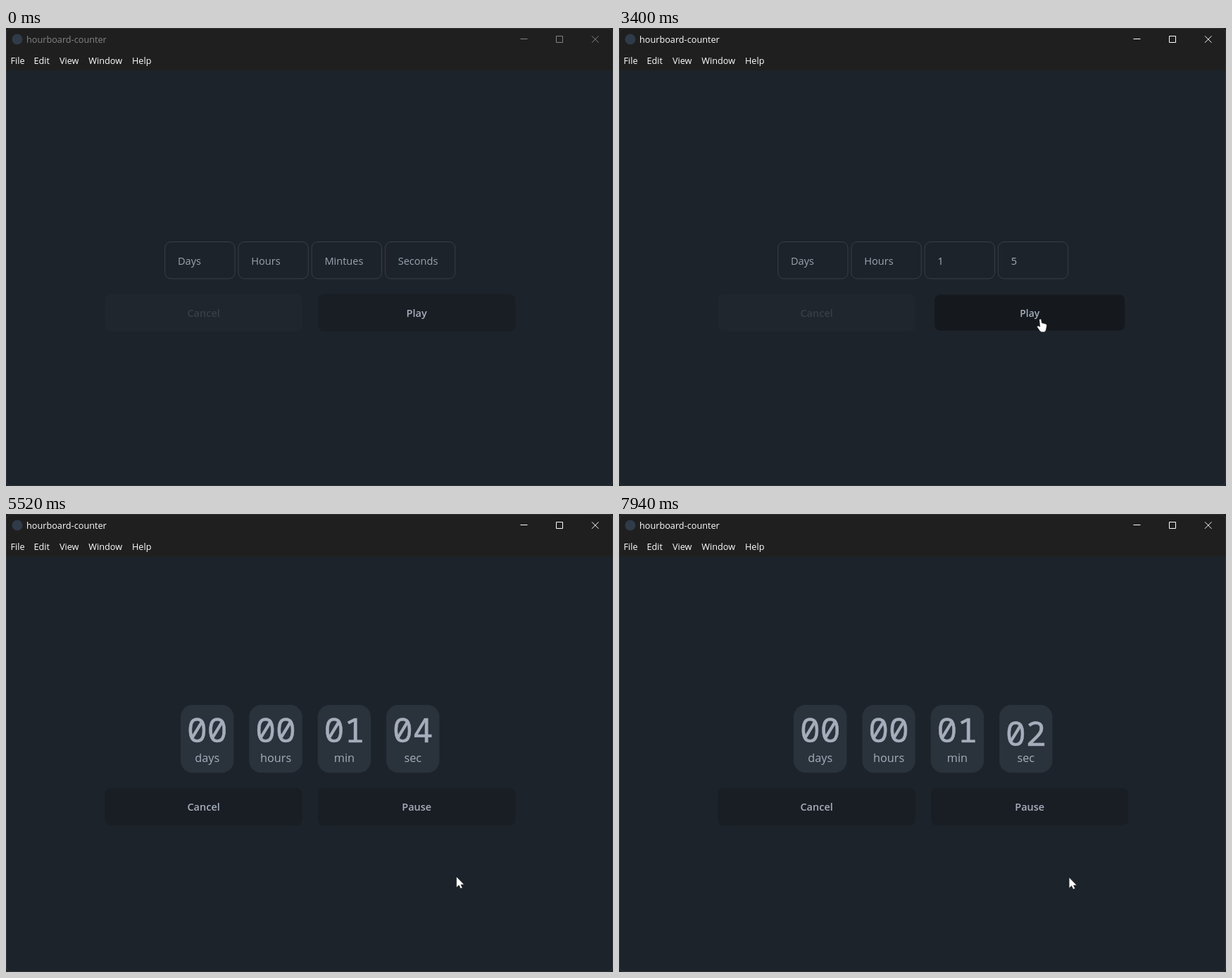
Recreate the animation shown at these times as an HTML page. Size 862 by 650 pixels, loop 8000 ms.

```html
<!DOCTYPE html>
<html lang="en">
<head>
<meta charset="utf-8">
<title>Countdown</title>
<style>
html, body { margin: 0; width: 100%; height: 100%; overflow: hidden; background: #1d232a; }
svg { display: block; width: 862px; height: 650px; font-family: "Open Sans", "Noto Sans", sans-serif; }
.digits { font: 48px "Noto Sans Mono", "DejaVu Sans Mono", monospace; stroke: #a6adbb; stroke-width: .6px; }
.mid { text-anchor: middle; }
</style>
</head>
<body>
<svg id="stage" viewBox="0 0 862 650" xmlns="http://www.w3.org/2000/svg"></svg>
<script>
const LOOP = 8000, FOCUS = 1430, TYPE_MIN = 1700, SECONDS_CLICK = 2240, TYPE_SEC = 2590, PRESS = 3340, START = 3465;
const TEXT = '#a6adbb', BASE = '#1d232a', BUTTON = '#191e24', FAINT = '#383f47', LINE = 52.3;
const stage = document.getElementById('stage');

function add(parent, tag, attrs = {}, text = '') {
  const el = document.createElementNS('http://www.w3.org/2000/svg', tag);
  set(el, attrs);
  el.textContent = text;
  parent.appendChild(el);
  return el;
}
function set(el, attrs) {
  for (const key in attrs) el.setAttribute(key, attrs[key]);
}
const show = (el, on) => set(el, { visibility: on ? 'visible' : 'hidden' });
const clamp = v => Math.max(0, Math.min(1, v));
const smooth = v => v * v * (3 - 2 * v);

// cubic-bezier(1, 0, 0, 1)
function snapEase(x) {
  if (x <= 0) return 0;
  if (x >= 1) return 1;
  let lo = 0, hi = 1;
  for (let i = 0; i < 24; i++) {
    const m = (lo + hi) / 2;
    if (3 * m * (1 - m) ** 2 + m ** 3 < x) lo = m; else hi = m;
  }
  return smooth(lo);
}

// window frame
add(stage, 'rect', { width: 862, height: 650, fill: BASE });
add(stage, 'rect', { width: 862, height: 60, fill: '#1f1f1f' });
add(stage, 'rect', { x: .5, y: .5, width: 861, height: 649, rx: 7, fill: 'none', stroke: '#45474a', 'stroke-opacity': .5 });
add(stage, 'circle', { cx: 16, cy: 16, r: 7.5, fill: '#2f3b49' });
const title = add(stage, 'text', { x: 29, y: 21.3, 'font-size': 12.7 }, 'hourboard-counter');
const controls = add(stage, 'path', {
  d: 'M730.5 15.5H740.5M781.5 11.5H790.5V20.5H781.5ZM832 11.3L841.5 20.8M841.5 11.3L832 20.8', fill: 'none'
});
[['File', 6.5], ['Edit', 39.5], ['View', 76], ['Window', 117.3], ['Help', 179]].forEach(([label, x]) =>
  add(stage, 'text', { x, y: 51, 'font-size': 12.7, fill: '#fff' }, label));

// setup form
const form = add(stage, 'g');
const fields = ['Days', 'Hours', 'Mintues', 'Seconds'].map((name, i) => {
  const x = 225.7 + i * 104.25, g = add(form, 'g');
  add(g, 'rect', { x, y: 303.5, width: 99.3, height: 52.3, rx: 8.5, fill: BASE, stroke: FAINT });
  const ring = add(g, 'rect', { x: x - 2.2, y: 301, width: 103.7, height: 57.3, rx: 10.5, fill: 'none', stroke: '#41464f', 'stroke-width': 2 });
  const text = add(g, 'text', { x: x + 18.2, y: 336, 'font-size': 14.6 });
  const spin = add(g, 'g');
  add(spin, 'rect', { x: x + 82.5, y: 304, width: 17, height: 51.7, fill: '#464646' });
  add(spin, 'path', { d: `M${x + 84} 320L${x + 91} 312.7L${x + 98} 320ZM${x + 84} 339.7H${x + 98}L${x + 91} 347Z`, fill: '#fff' });
  const caret = add(g, 'rect', { y: 320, width: 1, height: 21, fill: TEXT });
  return { name, x, ring, text, spin, caret };
});

// countdown cards
add(add(add(stage, 'defs'), 'clipPath', { id: 'window' }), 'rect', { x: 248, y: 279.7, width: 368, height: LINE });
const cards = add(stage, 'g');
const rollers = ['days', 'hours', 'min', 'sec'].map((label, i) => {
  const cx = 285.7 + i * 97.35;
  add(cards, 'rect', { x: cx - 37.7, y: 271, width: 75.4, height: 96.2, rx: 17, fill: '#2a323c' });
  add(cards, 'text', { class: 'mid', x: cx, y: 352, 'font-size': 16.3, fill: TEXT }, label);
  const g = add(cards, 'g', { 'clip-path': 'url(#window)' });
  return [0, 1].map(() => add(g, 'text', { class: 'mid digits', x: cx, fill: TEXT }));
});
function roll(pair, value) {
  pair.forEach((el, i) => {
    const n = Math.floor(value) + i;
    el.textContent = String(n).padStart(2, '0');
    set(el, { y: 324 + (n - value) * LINE });
    show(el, n - value < 1);
  });
}

// buttons
function makeButton(cx) {
  const g = add(stage, 'g');
  const box = add(g, 'rect', { x: cx - 140.2, y: 377.5, width: 280.4, height: 53, rx: 8.5 });
  const text = add(g, 'text', { class: 'mid', x: cx, y: 409.8, 'font-size': 14.5, 'font-weight': 600, fill: TEXT });
  return { g, box, text, cx };
}
const cancel = makeButton(280.6), play = makeButton(583.2);
cancel.text.textContent = 'Cancel';
function place(button, dy, scale) {
  set(button.g, { transform: `translate(${button.cx} ${404 + dy}) scale(${scale}) translate(${-button.cx} -404)` });
}
function popScale(t) {
  if (t < PRESS) return 1;
  if (t < START) return 1 - .036 * clamp((t - PRESS) / 50);
  const p = clamp((t - START) / 250);
  return p < .4 ? .98 + .04 * smooth(p / .4) : 1.02 - .02 * smooth((p - .4) / .6);
}

// pointer shapes, each drawn around its hot spot
const pointer = add(stage, 'g');
const outline = { fill: '#fff', stroke: '#111', 'stroke-width': .5, 'stroke-linejoin': 'round' };
const shapes = {
  arrow: add(pointer, 'path', { d: 'M-.3 -.3V15L3.2 11.8L5.5 16.6L8.2 15.4L6 10.9H10.6Z', ...outline }),
  hand: add(pointer, 'path', {
    d: 'M-1.7 1Q-.3 -.9 1.2 .8L1.9 5.6L7.6 7Q9.2 7.6 9 9.5L8 15Q7.4 18.3 4.8 18.4H2Q.3 18.4 -1 16.7L-4.8 11.3Q-4.9 9.4 -2.8 9.8L-.7 11Z', ...outline
  }),
  beam: add(pointer, 'path', {
    d: 'M-4 -7.5H-1.5L0 -6.5L1.5 -7.5H4M0 -6.5V7M-4 8H-1.5L0 7L1.5 8H4', fill: 'none', stroke: '#e8e8e8', 'stroke-width': 1.4
  })
};
const path = [
  [130, 688, 621], [890, 499, 331], [1030, 498, 331], [1770, 498, 331], [1980, 565, 396], [2240, 592, 333],
  [2730, 592, 333], [3140, 598.5, 413], [3500, 598.5, 413], [4100, 640, 514], [4710, 640, 514],
  [5520, 640, 515], [6400, 639.5, 516], [LOOP, 639.5, 516]
];
function pointerAt(t) {
  const i = Math.max(1, path.findIndex(p => p[0] > t));
  const [t0, x0, y0] = path[i - 1], [t1, x1, y1] = path[i];
  const k = smooth(clamp((t - t0) / (t1 - t0)));
  return { x: x0 + (x1 - x0) * k, y: y0 + (y1 - y0) * k };
}

function render(t) {
  const running = t >= START, dy = running ? 11.6 : 0, p = pointerAt(t);
  const focused = t >= FOCUS;
  const active = t < FOCUS || t >= PRESS ? -1 : t < SECONDS_CLICK ? 2 : 3;
  const typed = ['', '', t >= TYPE_MIN ? '1' : '', t >= TYPE_SEC ? '5' : ''];
  const keyTime = active === 2 ? (t < TYPE_MIN ? FOCUS : TYPE_MIN) : (t < TYPE_SEC ? SECONDS_CLICK : TYPE_SEC);
  const visible = t >= 130;
  let shape = 'arrow';

  set(title, { fill: focused ? '#fff' : '#858585' });
  set(controls, { stroke: focused ? '#fff' : '#858585' });

  set(form, { display: running ? 'none' : 'inline' });
  set(cards, { display: running ? 'inline' : 'none' });
  fields.forEach((f, i) => {
    const over = visible && !running && p.x >= f.x && p.x <= f.x + 99.3 && p.y >= 303 && p.y <= 356;
    if (over && p.x < f.x + 82) shape = 'beam';
    f.text.textContent = typed[i] || f.name;
    set(f.text, { fill: typed[i] ? TEXT : '#9ca3af' });
    show(f.ring, active === i);
    show(f.spin, over || active === i);
    show(f.caret, active === i && (t - keyTime) % 1000 < 500);
    set(f.caret, { x: f.x + (typed[i] ? 27 : 17.5) });
  });

  let seconds = 5 * snapEase((t - START) / 1000);
  for (let k = 0; k < 4; k++) seconds -= snapEase((t - 4545 - 1005 * k) / 1000);
  [0, 0, snapEase((t - START) / 1000), seconds].forEach((v, i) => roll(rollers[i], v));

  const overPlay = visible && Math.abs(p.x - play.cx) < 140 && Math.abs(p.y - 404 - dy) < 26.5;
  if (overPlay) shape = 'hand';
  set(play.box, { fill: overPlay ? '#15191e' : BUTTON });
  play.text.textContent = running ? 'Pause' : 'Play';
  place(play, dy, popScale(t));
  set(cancel.box, { fill: running ? BUTTON : '#20262e' });
  set(cancel.text, { fill: running ? TEXT : FAINT });
  place(cancel, dy, 1);

  set(pointer, { transform: `translate(${p.x} ${p.y})`, display: visible ? 'inline' : 'none' });
  for (const name in shapes) set(shapes[name], { display: name === shape ? 'inline' : 'none' });
}

const begin = performance.now();
function tick() {
  render((performance.now() - begin) % LOOP);
  requestAnimationFrame(tick);
}
tick();
</script>
</body>
</html>
```
